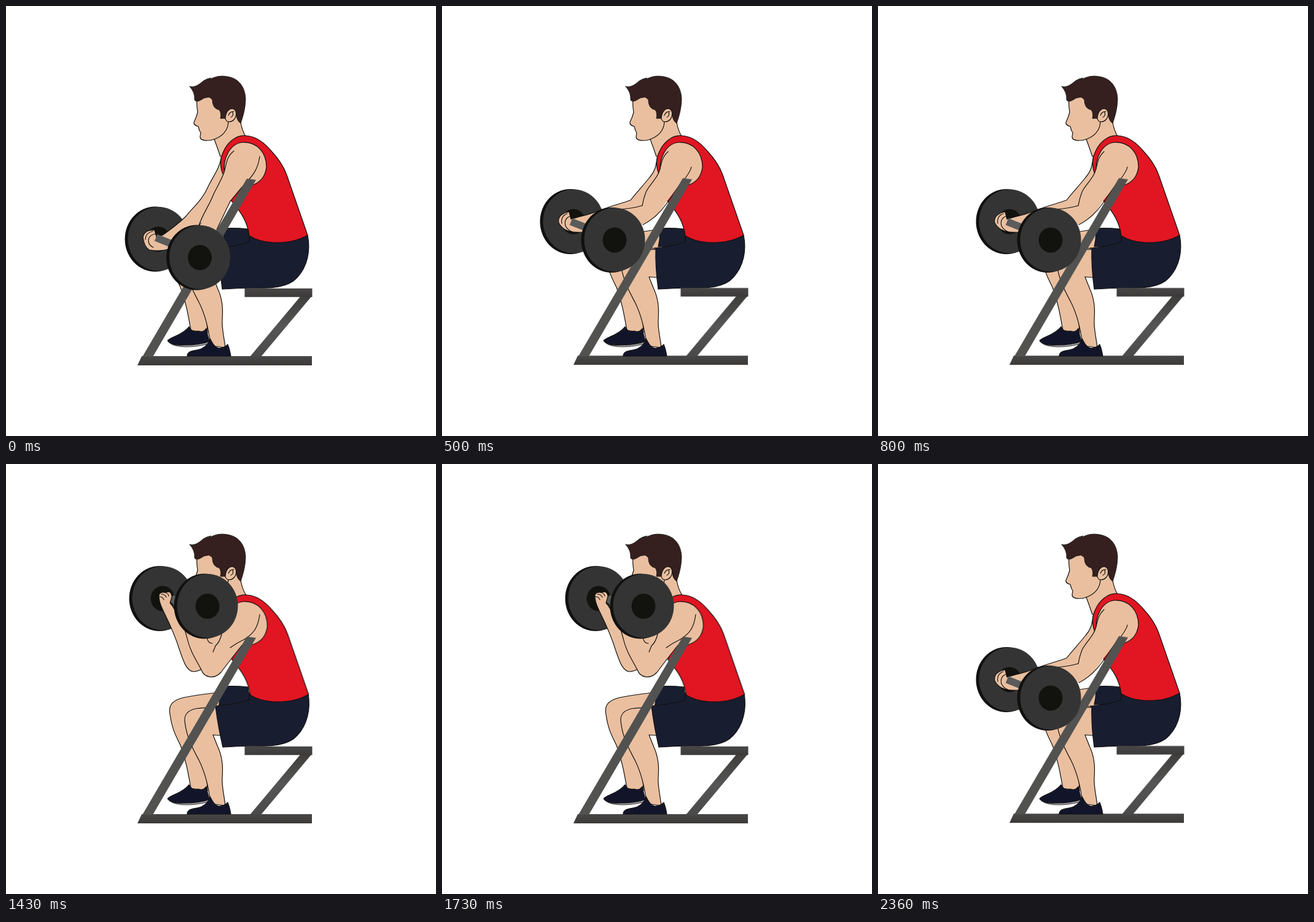
Animation of 700 by 700 pixels, one loop 2.86 s. Source, as an HTML page without scripts:

```html
<!DOCTYPE html>
<html lang="en">
<head>
<meta charset="utf-8">
<title>Preacher curl</title>
<style>
  html, body { margin: 0; width: 100%; height: 100%; overflow: hidden; background: #fff; }
  svg { display: block; width: 100vw; height: 100vh; }

  .ink { stroke: #111; stroke-width: 1.2; stroke-linejoin: round; stroke-linecap: round; }
  .skin { fill: #eabf9f; }
  .line { fill: none; }
  .red { fill: #e11622; }
  .navy { fill: #191d30; }
  .shoe { fill: #12152a; }
  .hair { fill: #35201f; }
  .steel { fill: #525251; }
  .rod { stroke: #5b5b5b; stroke-width: 12; }

  /* Poses: low, half, high, top; the first two and last two share a torso. */
  .low, .half, .high, .top, .down, .up { visibility: hidden; animation: 2.86s step-end infinite; }
  .low { animation-name: low; }
  .half { animation-name: half; }
  .high { animation-name: high; }
  .top { animation-name: top; }
  .down { animation-name: down; }
  .up { animation-name: up; }
  .shirt { animation: lean 2.86s step-end infinite; }
  .bench { animation: settle 2.86s step-end infinite; }

  @keyframes low { 0% { visibility: visible } 17.4825% { visibility: hidden } }
  @keyframes half {
    0%, 34.965% { visibility: hidden }
    17.4825%, 82.5175% { visibility: visible }
  }
  @keyframes high {
    0%, 50%, 82.5175% { visibility: hidden }
    34.965%, 67.4825% { visibility: visible }
  }
  @keyframes top { 0%, 67.4825% { visibility: hidden } 50% { visibility: visible } }
  @keyframes down { 0%, 82.5175% { visibility: visible } 34.965% { visibility: hidden } }
  @keyframes up { 0%, 82.5175% { visibility: hidden } 34.965% { visibility: visible } }
  @keyframes lean { 0%, 82.5175% { transform: none } 34.965% { transform: translate(1.5px, 2px) } }
  @keyframes settle {
    0%, 50% { transform: none }
    17.4825%, 67.4825% { transform: translateY(-.8px) }
  }
</style>
</head>
<body>
<svg viewBox="0 0 700 700">
  <defs>
    <linearGradient id="beam" x2="0" y2="1">
      <stop stop-color="#484747"/><stop offset="1" stop-color="#3c3a39"/>
    </linearGradient>
    <linearGradient id="strut" x2="0" y2="1">
      <stop stop-color="#3f3e3d"/><stop offset=".5" stop-color="#555"/><stop offset="1" stop-color="#4a4a4a"/>
    </linearGradient>
    <g id="plate">
      <ellipse cx="-5" cy="0" rx="49.5" ry="53" fill="#10100f"/>
      <ellipse cx="0" cy="-.5" rx="49.5" ry="52" fill="#343434"/>
      <ellipse rx="19.5" ry="20.5" fill="#12120f"/>
    </g>
  </defs>

  <g class="bench">
    <path fill="url(#strut)" d="M480 472H498L415 571H397Z"/>
    <path fill="url(#beam)" d="M221 570H498V585H214Z"/>
  </g>

  <g id="legs" class="ink">
    <path class="skin" d="M352 371C330 374 306 376 286 381C270 386 264 393 267 408C270 432 277 443 284 458C293 482 297 505 301 528L328 532L327 513L320 480L310 440L345 400Z"/>
    <path fill="#999" stroke-width=".7" d="M264 546C270 556 300 558 330 550V545Z"/>
    <path class="shoe" d="M263 545C268 538 286 537 298 522C303 532 309 530 313 529C319 532 323 529 326 525Q328 535 331 546C318 551 303 552 288 552Q269 553 263 545Z"/>
    <path class="skin" d="M352 396C335 397 322 396 310 398C295 401 290 408 291 419C294 446 305 465 314 482C323 500 330 525 333 553L357 556C355 538 351 525 352 510C354 488 351 474 345 461Q341 451 337 441L352 442Z"/>
    <path class="shoe" d="M295 569C296 560 308 562 318 558C328 553 331 547 332 541C337 551 341 557 347 557Q355 557 361 551Q364 558 366 570H295Z"/>
  </g>

  <g class="ink navy">
    <g class="down">
      <path class="skin" stroke="none" d="M318 369Q335 366 356 363V393H318Z"/>
      <path class="line" d="M318 369Q335 366 356 363M318 396L350 394"/>
      <path d="M354 362Q375 361 394 363L397 390L352 392Q356 376 354 362Z"/>
      <path d="M348 394Q378 391 396 384V372L491 373C496 398 491 424 474 442C460 458 430 460 410 459Q380 459 352 461Q347 425 348 394Z"/>
    </g>
    <g class="up">
      <path d="M352 362Q375 361 394 363L397 390L347 393Q348 374 352 362Z"/>
      <path d="M341 394Q375 391 396 384V372L492 374C496 398 491 424 474 442C460 458 430 460 410 459Q380 459 353 461Q345 427 341 394Z"/>
    </g>
  </g>

  <g id="far-side">
    <g class="low">
      <use href="#plate" x="248" y="379.5"/>
      <g class="ink">
        <path class="skin" d="M350 248C348 262 340 273 330 292C320 316 304 328 294 341C283 353 266 365 255 373L245 376L242 365C232 364 225 367 223 376C224 387 227 393 233 397Q250 400 264 396L300 372L350 320L362 260Z"/>
        <path class="line" d="M239 367Q227 369 227 380M243 371Q231 373 232 384Q234 391 240 393"/>
      </g>
      <path class="rod" d="M244 377L274 389"/>
    </g>
    <g class="half">
      <use href="#plate" x="214" y="351"/>
      <g class="ink">
        <path class="skin" d="M350 248C348 263 346 270 338 279C326 294 318 302 307 316C294 321 277 325 261 331Q242 339 224 343L210 347L207 335C197 337 188 342 190 353C196 364 206 370 229 368L270 345L322 332L362 260Z"/>
        <path class="line" d="M204 338Q193 342 195 354M209 342Q198 346 201 358Q205 365 211 367"/>
      </g>
      <path class="rod" d="M210 351L240 363"/>
    </g>
    <g class="high">
      <use href="#plate" x="242" y="281"/>
      <path class="rod" d="M257 281L272 274"/>
      <g class="ink">
        <path class="skin" d="M243 280Q244 274 251 276L257 279L265 284V299Q251 298 243 288Z"/>
        <path class="line" d="M248 276Q248 284 252 288M254 278Q253 284 257 289"/>
        <path class="skin" d="M350 249Q347 262 344 275H365V255Z"/>
      </g>
    </g>
    <g class="top">
      <use href="#plate" x="255" y="219"/>
      <path class="rod" d="M269 218L284 230"/>
      <g class="ink">
        <path class="skin" d="M249 213Q251 208 258 209L266 208Q270 211 270 216L267 226Q275 235 280 250L330 300L320 333Q312 338 305 338C294 337 289 321 284 307C277 284 269 265 256 239Q248 223 249 213Z"/>
        <path class="line" d="M258 209Q264 210 265 215M253 212Q259 212 261 217M250 216Q255 216 257 221"/>
      </g>
    </g>
  </g>

  <g id="head" class="ink">
    <path class="skin" d="M311 152C310 160 311 166 312 173Q310 181 306 189Q305 194 313 196L315 203L317 206L316 213Q316 219 328 219Q334 219 339 217Q344 230 349 245L380 250L390 212Q384 202 382 189L368 150L330 144Z"/>
    <path class="line" d="M339 217C352 212 361 204 362 189"/>
    <path class="hair" stroke-width=".8" d="M299 131C309 133 315 127 321 122Q327 118 334 117L331 120C341 114 351 113 361 115C380 118 389 133 390 150C390 164 387 177 382 191Q376 187 375 178L357 183H349Q351 174 347 169C340 168 336 162 336 153Q332 147 327 149C321 149 318 154 312 155Q309 156 307 153Q308 141 299 131Z"/>
    <path class="skin" d="M357 184C357 174 362 167 369 167C376 169 376 178 372 184Q367 190 360 188Z"/>
    <path class="line" d="M362 178Q365 171 371 172M369 173Q371 179 366 181"/>
  </g>

  <g class="shirt ink">
    <path class="red" d="M354 276C348 262 348 250 353 239C360 222 374 210 390 211C407 212 420 222 431 235C445 250 452 261 457 275L491 373C474 383 454 386 434 385Q412 384 396 374C393 352 384 337 366 316L380 290Z"/>
    <path class="skin" d="M356 272C352 250 364 224 385 222C410 221 424 240 424 262C422 280 412 288 400 292L378 297Z"/>
  </g>

  <g id="near-arm" class="ink">
    <g class="low">
      <path class="skin" stroke="none" d="M358 262L400 260L384 295L365 318L343 366H312L340 304Z"/>
      <path class="line" d="M371 236C358 246 359 258 355 271C350 284 344 294 338 306C331 325 320 338 313 360M413 245C410 267 402 276 384 295L365 318L343 364"/>
    </g>
    <g class="half">
      <path class="skin" stroke="none" d="M358 258L400 260L384 295L366 318L350 341Q340 349 325 356L255 350L290 331L326 325L333 302L352 275Z"/>
      <path class="line" d="M368 237C356 247 358 260 352 273C346 285 336 294 332 303Q328 313 326 325Q308 330 288 331M406 262Q404 272 384 295C370 314 358 340 327 356"/>
    </g>
    <g class="high">
      <path class="skin" stroke="none" d="M358 262L402 262L384 295L366 318L350 338Q340 351 323 343L320 300Z"/>
      <path class="line" d="M371 236Q358 248 358 270M413 245C410 268 402 277 387 286Q368 296 361 312M384 295L366 319L352 337Q342 350 323 343"/>
    </g>
    <g class="top">
      <path class="skin" stroke="none" d="M358 262L402 262L384 295L366 318L350 339C338 352 322 347 318 335C309 318 299 303 295 284L290 266Z"/>
      <path class="line" d="M413 245C410 268 402 277 387 286Q376 291 365 299M384 295L366 318L350 339C338 352 322 347 318 335C309 318 299 303 295 284L290 266M351 277Q348 290 341 296L337 306M327 281Q328 292 336 292"/>
    </g>
  </g>

  <g class="bench">
    <path class="steel" d="M392 281L407 283L239 571H222Z"/>
    <path fill="url(#beam)" d="M388.500 459.800H498.500V473.800H388.500Z"/>
  </g>

  <g id="near-plate">
    <use class="low" href="#plate" x="315.500" y="409.500"/>
    <use class="half" href="#plate" x="281" y="381"/>
    <use class="high" href="#plate" x="315" y="292.500"/>
    <use class="top" href="#plate" x="328" y="231.500"/>
  </g>
</svg>
</body>
</html>
```
